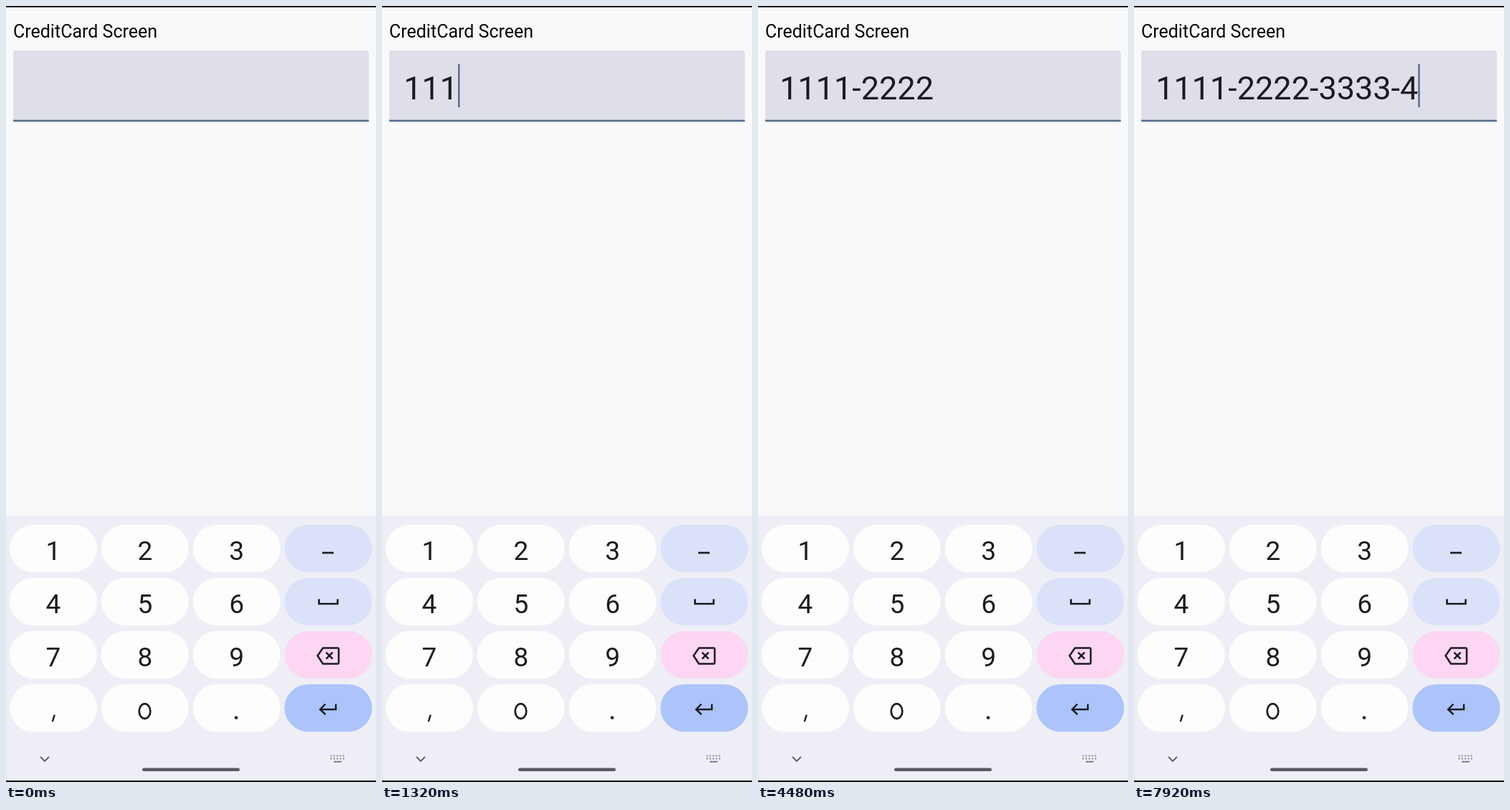
An HTML page for the animation above (8 s loop, 516x1080 px).

```html
<!DOCTYPE html>
<html lang="en">
<head>
<meta charset="utf-8">
<title>Card number entry</title>
<style>
  html, body { margin: 0; width: 100%; height: 100%; overflow: hidden; background: #f9f9fb; }
  svg { display: block; width: 516px; height: 1080px; font-family: Roboto, sans-serif; }
  .ink { fill: none; stroke: #1b1b20; stroke-width: 2.7; }
</style>
</head>
<body>
<svg viewBox="0 0 516 1080">
  <rect width="516" height="1080" fill="#f9f9fb"/>
  <text x="10" y="44" font-size="25" fill="#08080a">CreditCard Screen</text>
  <path d="M10 161V66q0-4 4-4H502q4 0 4 4V161z" fill="#dfdfea"/>
  <rect x="10" y="158.5" width="496" height="2.5" fill="#576a8f"/>
  <text id="number" x="30.2" y="130" font-size="45" fill="#1b1b20"></text>
  <rect id="cursor" y="81" width="2.4" height="60" fill="#576a8f"/>

  <rect y="709" width="516" height="371" fill="#eeeef6"/>
  <g id="keys"></g>
  <g class="ink">
    <path d="M441 761H457"/>
    <path d="M436.5 825.5V832H462.5V825.5"/>
    <path d="M434.5 904.3L442 893.5H462.5Q464 893.5 464 895V914Q464 915.5 462.5 915.5H442ZM446.5 899.7l9 9m0-9l-9 9" stroke-width="2.5"/>
    <path d="M460 971.5V979H438.5M445.5 971.5L438 979L445.5 986" stroke-width="2.4"/>
    <path d="M67.8 986.5L64.8 996" stroke-width="2.4"/>
    <ellipse cx="193.5" cy="981.5" rx="7.8" ry="10.3"/>
  </g>
  <circle cx="321" cy="990.5" r="2.3" fill="#1b1b20"/>
  <path d="M48 1045L54 1051L60 1045" fill="none" stroke="#5a5a62" stroke-width="1.8"/>
  <rect x="190" y="1060.5" width="136" height="4.5" rx="2.25" fill="#5a5a62"/>
  <g stroke="#808088" stroke-width="2">
    <path d="M452.5 1043.5H472M452.5 1047.5H472" stroke-dasharray="2 2.3"/>
    <path d="M457 1051.8H468"/>
  </g>
  <path d="M0 .8H516M0 1079H516" stroke="#000" stroke-width="1.8"/>
</svg>
<script>
const LOOP = 8000, FIRST_BLINK = 40, BLINK = 500;
const number = document.getElementById('number');
const cursor = document.getElementById('cursor');

// Keypad: four columns by four rows
const digits = ['123', '456', '789', ''];
const sideColors = ['#dbe1f8', '#dbe1f8', '#fcd6f3', '#adc4fb'];
let pad = '';
for (let row = 0; row < 4; row++) {
  for (let col = 0; col < 4; col++) {
    const x = 5 + col * 127.8, y = 722 + row * 74;
    const fill = col < 3 ? '#fdfdfd' : sideColors[row];
    pad += `<rect x="${x}" y="${y}" width="122" height="66" rx="33" fill="${fill}"/>
      <text x="${x + 61}" y="${y + 48.7}" font-size="37" text-anchor="middle" fill="#1b1b20">${digits[row][col] || ''}</text>`;
  }
}
document.getElementById('keys').innerHTML = pad;

// Each digit is tapped four times at a steady pace
const STEP = 270;
const groupStarts = [780, 2050, 5740, 7800];
const presses = groupStarts.flatMap(s => [0, 1, 2, 3].map(i => s + i * STEP));
const card = '1111222233334444';

function draw(t) {
  const count = presses.filter(p => p <= t).length;
  const last = count ? presses[count - 1] : FIRST_BLINK;
  number.textContent = card.slice(0, count).replace(/(\d{4})(?=\d)/g, '$1-');
  const width = count ? number.getComputedTextLength() : 0;
  cursor.setAttribute('x', 30.2 + width);
  const on = t >= FIRST_BLINK && (t - last) % (2 * BLINK) < BLINK;
  cursor.setAttribute('visibility', on ? 'visible' : 'hidden');
}

const start = performance.now();
function tick() {
  draw((performance.now() - start) % LOOP);
  requestAnimationFrame(tick);
}
tick();
</script>
</body>
</html>
```
